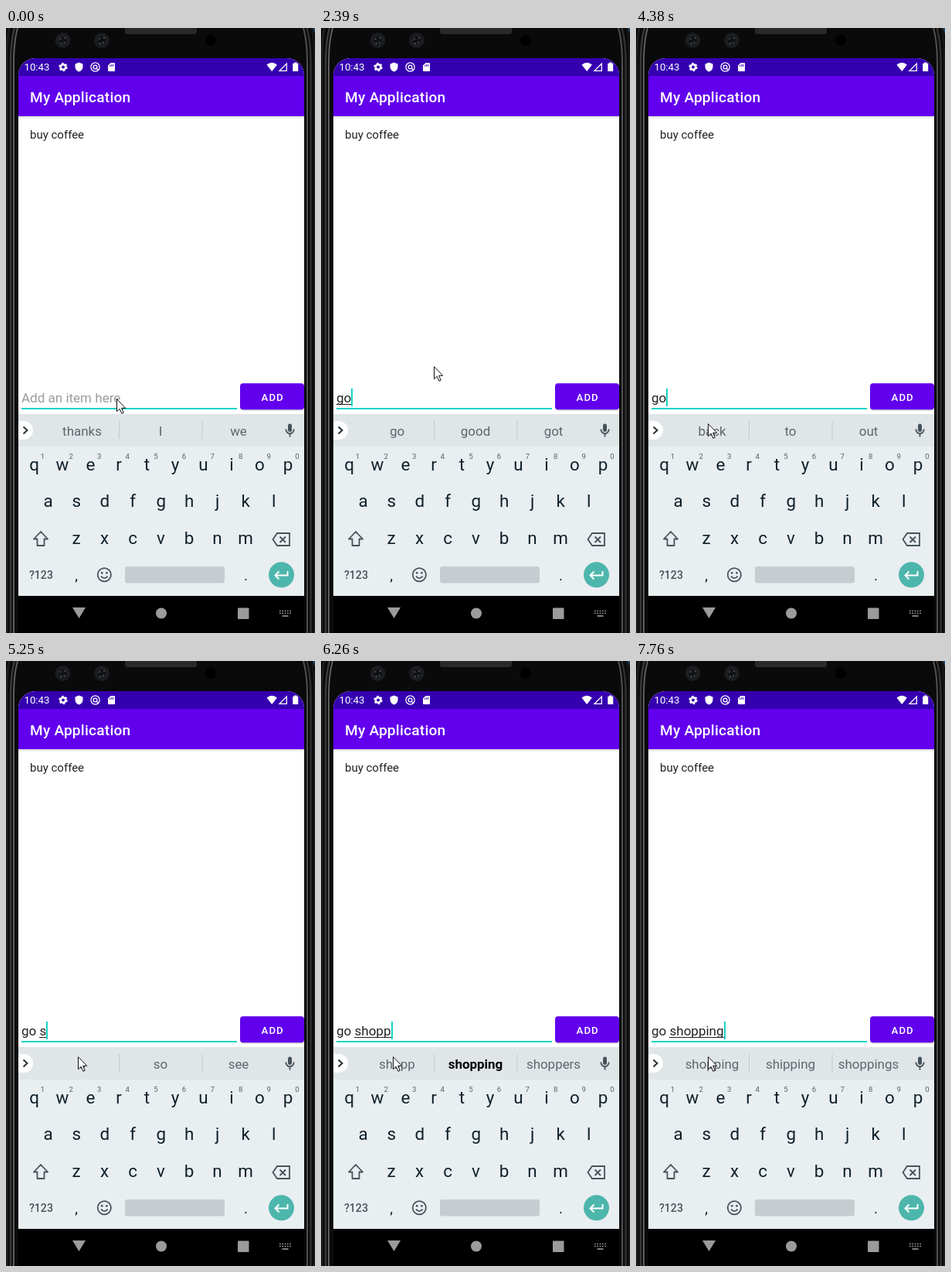
Write an HTML page that moves like this. It is 400 px wide and 782 px high and loops after 8000 ms.

```html
<!DOCTYPE html>
<html lang="en">
<head>
<meta charset="utf-8">
<title>To-do list</title>
<style>
html, body { margin: 0; width: 100%; height: 100%; overflow: hidden; background: #0a0a0b; }
svg { display: block; width: 400px; height: 782px; font-family: Roboto, sans-serif; }
text { white-space: pre; }
.mid { text-anchor: middle; }
.medium { font-weight: 500; }
.key { font-size: 22.4px; fill: #10212a; }
.mark { font-size: 19px; fill: #10212a; }
.hint { font-size: 9.6px; fill: #566168; }
.word { font-size: 16.96px; fill: #5c676d; }
.word.best { font-weight: 700; fill: #000; }
.line { fill: none; stroke: #46535a; stroke-width: 1.8; }
</style>
</head>
<body>
<svg viewBox="0 0 400 782">
  <defs>
    <clipPath id="screen"><path d="M16 782V61a22 22 0 0 1 22-22H364a22 22 0 0 1 22 22V782z"/></clipPath>
    <linearGradient id="shade" x2="0" y2="1">
      <stop stop-color="#000" stop-opacity=".14"/><stop offset="1" stop-color="#000" stop-opacity="0"/>
    </linearGradient>
  </defs>

  <!-- phone body -->
  <rect width="400" height="782" fill="#0a0a0b"/>
  <g fill="none">
    <path d="M4 0Q1 18 1 45V782" stroke="#1d1d1e" stroke-width="3"/>
    <path d="M11 0Q6 18 6 45V782" stroke="#39393a" stroke-width="2.500"/>
    <path d="M15 0Q10 18 10 45V782" stroke="#5e5e5f" stroke-width="2"/>
    <path d="M385 0Q390 18 390 45V782" stroke="#505051" stroke-width="2"/>
    <path d="M389.500 0Q394.500 18 394.500 45V782" stroke="#303031" stroke-width="2.500"/>
    <path d="M396 0Q399 15 399 45V782" stroke="#18181a" stroke-width="2"/>
  </g>
  <path d="M397 0h3v8z" fill="#1d4160"/>
  <rect x="154" y="-4" width="93" height="12" rx="3" fill="#29292a"/>
  <g id="cams"></g>
  <circle cx="265" cy="16" r="7" fill="#000"/>

  <g clip-path="url(#screen)">
    <rect x="16" y="39" width="370" height="743" fill="#fff"/>
    <rect x="16" y="39" width="370" height="23" fill="#3500b0"/>
    <rect x="16" y="62" width="370" height="52" fill="#6200ee"/>
    <rect x="16" y="114" width="370" height="4" fill="url(#shade)"/>

    <!-- status bar -->
    <g fill="#fff">
      <text x="23.500" y="55.300" font-size="13.200">10:43</text>
      <circle cx="74" cy="50.500" r="3.300" fill="none" stroke="#fff" stroke-width="2.600"/>
      <circle cx="74" cy="50.500" r="4.900" fill="none" stroke="#fff" stroke-width="1.600" stroke-dasharray="2.566"/>
      <path d="M94.500 44.500l5 2v3.500q0 4.700-5 6.500q-5-1.800-5-6.500v-3.500z"/>
      <g fill="none" stroke="#fff" stroke-width="1.300">
        <circle cx="115.500" cy="50.500" r="5.600"/><circle cx="115.500" cy="50.500" r="2.400"/>
        <path d="M117 52l3 3"/>
      </g>
      <path d="M135.500 45h4.500q1 0 1 1v9q0 1-1 1h-7q-1 0-1-1v-6.500z"/>
      <path d="M134.700 47.800v2M136.700 47v2.800M138.700 47v2.800" stroke="#3500b0"/>
      <path d="M337.500 47.500q6.700-5.500 13.400 0L344.200 56z"/>
      <path d="M363.300 46v9.300H354z" fill="none" stroke="#fff" stroke-width="1.300"/>
      <path d="M373 44.500h3.500v1.300h1.700v10.200h-7V45.800h1.800z"/>
    </g>
    <text class="medium" x="31" y="95.700" font-size="19.050" letter-spacing=".25" fill="#fff">My Application</text>
    <text x="31" y="143" font-size="15" fill="#222">buy coffee</text>

    <!-- input row -->
    <rect x="303" y="461" width="83" height="33.500" rx="4" fill="#000" opacity=".18"/>
    <rect x="303" y="459.300" width="83" height="34" rx="4" fill="#6200ee"/>
    <text class="medium" x="330.600" y="481.700" font-size="13.190" letter-spacing="1.050" fill="#fff">ADD</text>
    <rect x="20" y="491" width="279" height="2" fill="#18d3c5"/>
    <text id="entry" x="20" y="484.200" font-size="17.020"></text>
    <rect id="under" y="486" height="1" fill="#222"/>
    <rect id="caret" y="466" width="2" height="23" fill="#18d3c5"/>

    <!-- keyboard -->
    <rect x="16" y="499" width="370" height="235" fill="#e9eef1"/>
    <rect x="16" y="499" width="370" height="42" fill="#e0e5e8"/>
    <path d="M16 508h7a12 12 0 0 1 0 24h-7z" fill="#fff"/>
    <path d="M22.500 515.500l5 4.500l-5 4.500" fill="none" stroke="#222d33" stroke-width="1.900"/>
    <path d="M146.500 508v23M254 508v23" stroke="#c3c9cc"/>
    <g id="words"></g>
    <rect x="365" y="511.500" width="5" height="10.500" rx="2.500" fill="#46535a"/>
    <path d="M362.300 518.500a5.200 5.700 0 0 0 10.400 0M367.500 524v4.500" class="line"/>
    <g id="keys"></g>
    <path class="line" d="M45 651l9 9.500h-4.500v8.500h-9v-8.500h-4.500z" stroke-linejoin="round"/>
    <path class="line" d="M351 653h16v16h-16l-5.500-8zM354.500 657.500l7.500 7.500M362 657.500l-7.500 7.500"/>
    <text class="medium" x="30" y="711.700" font-size="14.100" fill="#46535a">?123</text>
    <circle class="line" cx="127.300" cy="706.800" r="8.600"/>
    <circle cx="124.200" cy="704.300" r="1.400" fill="#46535a"/>
    <circle cx="130.400" cy="704.300" r="1.400" fill="#46535a"/>
    <path class="line" d="M123 708.700q4.300 5 8.600 0"/>
    <rect x="154" y="696" width="129" height="21.500" rx="3" fill="#c7ccd0"/>
    <circle cx="356.500" cy="706.800" r="16.500" fill="#4db6ac"/>
    <path d="M364.500 702v5.500h-15.500M353.500 702.500l-5 5l5 5" fill="none" stroke="#fff" stroke-width="2"/>

    <!-- navigation bar -->
    <rect x="16" y="734" width="370" height="48" fill="#000"/>
    <g fill="#9b9b9b">
      <path d="M86 749h17l-8.500 14z"/>
      <circle cx="201" cy="756.500" r="7"/>
      <rect x="300" y="749.500" width="14.500" height="14.500" rx="1"/>
      <path d="M354 753.500h15M354 756.500h15" stroke="#9b9b9b" stroke-width="1.600" stroke-dasharray="1.700 1.600"/>
      <path d="M357.500 760h8" stroke="#9b9b9b" stroke-width="1.600"/>
    </g>
  </g>

  <path id="pointer" d="M.5.700V16.700L4.200 13.300L6.800 19.300L9.200 18.300L6.600 12.300H11.700Z" fill="#fff" stroke="#111"/>
</svg>
<script>
const $ = id => document.getElementById(id);
const LOOP = 8000;

function add(parent, tag, attrs, text = '') {
  const el = document.createElementNS('http://www.w3.org/2000/svg', tag);
  for (const name in attrs) el.setAttribute(name, attrs[name]);
  el.textContent = text;
  return parent.appendChild(el);
}

for (const cx of [73.5, 124]) {
  add($('cams'), 'circle', { cx, cy: 16, r: 10, fill: '#1b1c1f' });
  add($('cams'), 'circle', { cx, cy: 16, r: 6, fill: '#101216', stroke: '#26292e' });
  for (const [x, y] of [[-3, -2], [3, -3], [2, 3], [-2, 4]])
    add($('cams'), 'circle', { cx: cx + x, cy: 16 + y, r: 1, fill: '#565d64' });
}

function keyRow(letters, x, y, kind = 'key', gap = 36.5) {
  [...letters].forEach((ch, i) => add($('keys'), 'text', { class: kind + ' mid', x: x + i * gap, y }, ch));
}
keyRow('qwertyuiop', 36.5, 572.2);
keyRow('asdfghjkl', 54.7, 619.2);
keyRow('zxcvbnm', 91, 667.2);
keyRow('1234567890', 47.5, 557, 'hint', 36.6);
keyRow(',', 91, 713.5, 'mark');
keyRow('.', 310.5, 713.5, 'mark');

const words = [98.5, 200, 301].map(x => add($('words'), 'text', { class: 'word mid', x, y: 526.5 }));

// time, typed text, caret x, underline start (0 = none), suggestions (* = best match)
const typing = [
  [0, '', 20, 0, 'thanks I we'],
  [1360, 'go', 39, 20, 'go good got'],
  [3350, 'go', 39, 0, 'back to out'],
  [4630, 'go ', 43, 0, 'back to out'],
  [5250, 'go s', 52, 43, 's so see'],
  [5750, 'go sh', 62, 43, 'sh *shopping shower'],
  [5870, 'go sho', 71, 43, 'sho *shopping shower'],
  [6140, 'go shop', 81, 43, 'shop *shopping shops'],
  [6260, 'go shopp', 91, 43, 'shopp *shopping shoppers'],
  [6380, 'go shoppi', 95, 43, 'shoppi *shopping shoppings'],
  [6630, 'go shoppin', 104, 43, 'shoppin *shopping shoppings'],
  [6750, 'go shopping', 114, 43, 'shopping shipping shoppings']
];
const blink = [[0, 0], [150, 1], [550, 0], [1050, 1], [1860, 0], [2390, 1], [2930, 0], [3350, 1],
  [3860, 0], [4380, 1], [5130, 0], [5250, 1], [7250, 0], [7760, 1]];
const moves = [[0, 143, 479], [150, 146, 437], [2540, 113, 475], [2680, 101, 495], [2800, 95, 507], [2930, 93, 511]];

const at = (list, t) => list.filter(row => row[0] <= t).pop();
let shown;

function draw(t) {
  const step = at(typing, t);
  if (step !== shown) {
    shown = step;
    const [, text, x, from, picks] = step;
    $('entry').textContent = text || 'Add an item here';
    $('entry').setAttribute('fill', text ? '#222' : '#9b9b9b');
    $('caret').setAttribute('x', x);
    $('under').setAttribute('x', from);
    $('under').setAttribute('width', from ? x - from : 0);
    picks.split(' ').forEach((pick, i) => {
      words[i].textContent = pick.replace('*', '');
      words[i].classList.toggle('best', pick[0] === '*');
    });
  }
  $('caret').setAttribute('opacity', at(blink, t)[1]);
  const [, x, y] = at(moves, t);
  $('pointer').setAttribute('transform', `translate(${x} ${y})`);
}

const start = performance.now();
function tick() {
  draw((performance.now() - start) % LOOP);
  requestAnimationFrame(tick);
}
tick();
</script>
</body>
</html>
```
